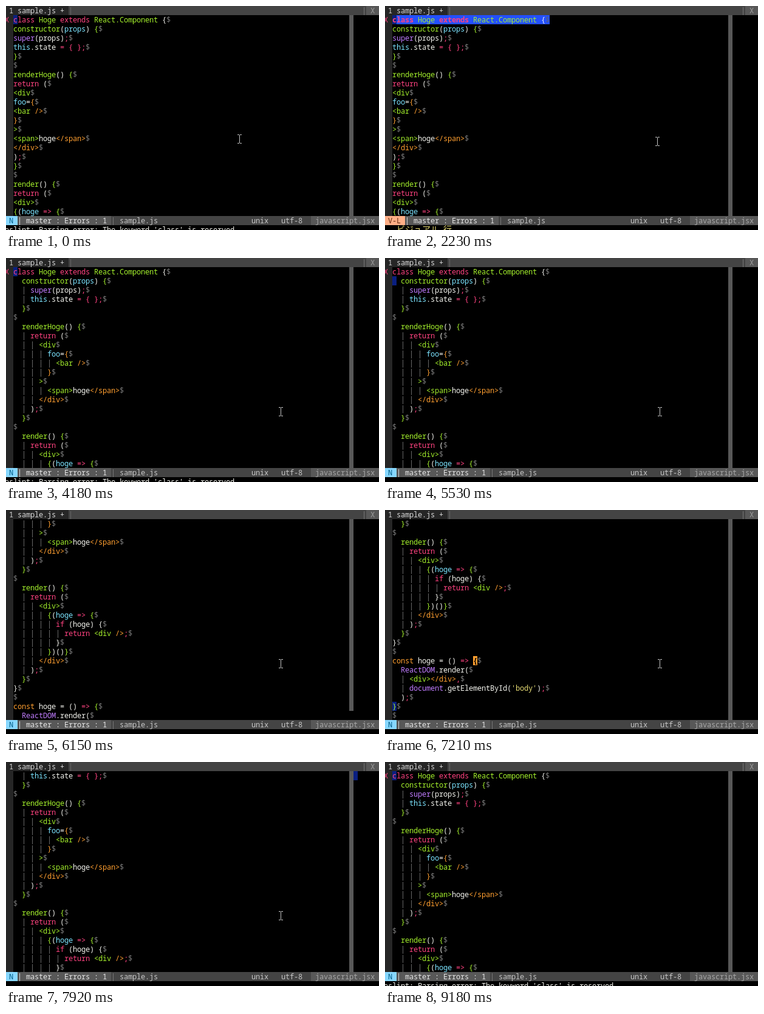
Animation of 614 by 368 pixels, one loop 9.54 s. Source, as an HTML page with a canvas:

```html
<!DOCTYPE html>
<html lang="en">
<head>
<meta charset="utf-8">
<title>Indenting JSX in a terminal editor</title>
<style>
  html, body { margin: 0; width: 100%; height: 100%; overflow: hidden; background: #000; }
  canvas { display: block; }
</style>
</head>
<body>
<canvas id="stage" width="614" height="368"></canvas>
<script>
const ctx = document.getElementById('stage').getContext('2d');
const LOOP = 9540, CW = 7, LH = 15, LEFT = -2, ROWS = 22, LAST = 37;
const FONT = '12px "Noto Sans Mono", "DejaVu Sans Mono", monospace';
const WIDE = '14px "Noto Sans CJK JP", "Noto Sans CJK", sans-serif';

const INK = {
  w: '#f4f4ee', p: '#ff4380', g: '#a4f02c', c: '#7ce4ff',
  o: '#ff9f30', v: '#c07cff', y: '#e6db74', d: '#767676'
};
const SELECT = '#2350ff', CURSOR = '#0a1f80', BAR = '#585858';

// "^x" switches the ink; the leading digit is the indent depth.
const SOURCE = `0^pclass ^gHoge ^pextends ^gReact.Component ^w{
1^gconstructor^w(^cprops^w) ^g{
2^vsuper^w(props)^p;
2^cthis^w.state ^p= { };
1^g}
0
1^grenderHoge^w() ^g{
2^preturn ^w(
3^g<div
4^cfoo^w=^o{
5^g<bar ^o/>
4^o}
3^g>
4^g<span>^whoge^o</span>
3^o</div>
2^w)^p;
1^g}
0
1^grender^w() ^g{
2^preturn ^w(
3^g<div>
4^g{^w(^choge ^p=> ^g{
5^pif ^w(hoge) {
6^preturn ^g<div ^o/>^p;
5^w}
4^g}^w)()^g}
3^o</div>
2^w)^p;
1^g}
0^w}
0
0^oconst ^whoge = () ^p=> ^g{
1^vReactDOM^w.render(
2^g<div>^o</div>^p,
2^vdocument^w.getElementById(^y'body'^w)^p;
1^w)^p;
0^g}
0`;

const LINES = SOURCE.split('\n').map(line => ({
  depth: +line[0],
  runs: line.slice(1).split('^').filter(Boolean).map(s => [s[0], s.slice(1)])
}));

const ESLINT = "eslint: Parsing error: The keyword 'class' is reserved";
const STATES = [
  [0, { cursor: 0, msg: ESLINT }],
  [2230, { cursor: 0, visual: 1, msg: '-- ビジュアル 行 --', tone: INK.y }],
  [2670, { top: 16, cursor: 37, visual: 37, msg: '-- ビジュアル 行 --', tone: INK.y }],
  [3570, { top: 16, visual: 37, msg: '37 行がインデントされます.. ', prompt: true }],
  [3650, { cursor: 0, tidy: true, msg: ESLINT }],
  [5530, { cursor: 1, tidy: true }]
];

// Held keys move the cursor in quickening steps and drag the view along.
[8, 14, 20, 26, 32, 35, 36, LAST].forEach((line, i) => {
  const top = Math.max(0, line - ROWS + 1), moving = top > 0 && line < LAST;
  STATES.push([5800 + Math.floor(87.2 * i), { top, tidy: true, cursor: moving ? null : line, short: moving }]);
});
STATES.push([7210, { top: 16, tidy: true, cursor: 36, match: true }]);
[28, 20, 12, 6, 3, 1, 0].forEach((line, i) => {
  const top = Math.min(16, line), moving = top < 16 && line > 0;
  STATES.push([7480 + Math.floor(88.4 * i), {
    top, tidy: true, cursor: moving ? null : line, parked: moving, msg: line ? '' : ESLINT
  }]);
});

const MOUSE = [
  [0, [384, 218]], [720, [430, 252]], [810, [472, 285]],
  [980, [544, 292]], [1065, [490, 250]], [1150, [448, 222]],
  [4100, [450, 238]], [4180, [452, 252]],
  [8460, [465, 290]], [8550, null], [9090, [608, 367]], [9180, null]
];

const at = (track, t) => track.reduce((now, [start, value]) => start <= t ? value : now, track[0][1]);
const colX = col => LEFT + col * CW;

function box(x, y, w, h, color) {
  ctx.fillStyle = color;
  ctx.fillRect(x, y, w, h);
}

function cells(col, row, count, color) {
  box(colX(col), row * LH, count * CW, LH, color);
}

// Writes on the terminal grid and returns the next free column.
function write(text, col, row, color, bold) {
  ctx.fillStyle = color;
  for (const ch of text) {
    const wide = ch > '\u2fff';
    ctx.font = (bold ? 'bold ' : '') + (wide ? WIDE : FONT);
    ctx.fillText(ch, colX(col), row * LH + 12);
    col += wide ? 2 : 1;
  }
  return col;
}

function drawLine(index, row, s) {
  const { depth, runs } = LINES[index];
  const indent = s.tidy ? depth * 2 : index === 23 ? 2 : 0;
  const length = indent + runs.reduce((n, r) => n + r[1].length, 0);
  const selected = index < (s.visual || 0);
  if (selected) cells(2, row, length + 1, SELECT);
  if (s.cursor === index) cells(2, row, 1, CURSOR);
  if (s.tidy) for (let i = 2; i < indent; i += 2) write('|', 2 + i, row, INK.d);
  let col = 2 + indent;
  for (const [ink, text] of runs) col = write(text, col, row, INK[ink], selected && ink === 'p');
  write('$', col, row, selected ? '#56627c' : INK.d);
  if (s.match && index === 31) {
    cells(col - 1, row, 1, INK.o);
    write('{', col - 1, row, '#000', true);
  }
}

function drawTabs() {
  box(0, 0, 614, LH, '#444');
  box(0, 0, colX(15), LH, '#262626');
  write('1 sample.js +', 1, 0, '#d8d8d8');
  write('|', 15, 0, '#6c6c6c');
  cells(85, 0, 4, BAR);
  write('|', 84, 0, '#808080');
  write('X', 86, 0, '#9e9e9e');
}

function drawStatus(visual) {
  const row = 23, mode = visual ? 'V-L' : 'N', start = mode.length + 2;
  box(0, row * LH, 614, LH, '#444');
  cells(0, row, start, visual ? '#ffaf87' : '#87d7ff');
  cells(start, row, 22, BAR);
  cells(72, row, 17, BAR);
  write(mode, 1, row, visual ? '#5f2a10' : '#005f87');
  write('|', start, row, '#e4e4e4');
  write('master : Errors : 1', start + 2, row, '#e8e8e8');
  write('|', start + 22, row, '#808080');
  write('sample.js', start + 24, row, '#c6c6c6');
  write('unix', 58, row, '#c6c6c6');
  write('utf-8', 65, row, '#c6c6c6');
  write('javascript.jsx', 73, row, '#a8a8a8');
}

function drawMouse([x, y]) {
  const ink = '#c4c4c4';
  box(x, y - 6, 1, 13, ink);
  for (const dy of [-7, 7]) {
    box(x - 3, y + dy, 3, 1, ink);
    box(x + 1, y + dy, 3, 1, ink);
  }
}

function draw() {
  const t = performance.now() % LOOP, s = at(STATES, t), top = s.top || 0;
  box(0, 0, 614, 368, '#000');
  box(0, LH, 12, ROWS * LH, '#262626');
  for (let r = 0; r < ROWS; r++) drawLine(top + r, r + 1, s);
  if (!top) write('X', 0, 1, INK.p);
  box(565, LH, CW, (ROWS - (s.short ? 1 : 0)) * LH, BAR);
  if (s.parked) cells(82, 1, 1, CURSOR);
  drawTabs();
  drawStatus(s.visual);
  const end = write(s.msg || '', 0, 24, s.tone || INK.w);
  if (s.prompt) cells(end, 24, 1, CURSOR);
  const mouse = at(MOUSE, t);
  if (mouse) drawMouse(mouse);
  requestAnimationFrame(draw);
}
draw();
</script>
</body>
</html>
```
